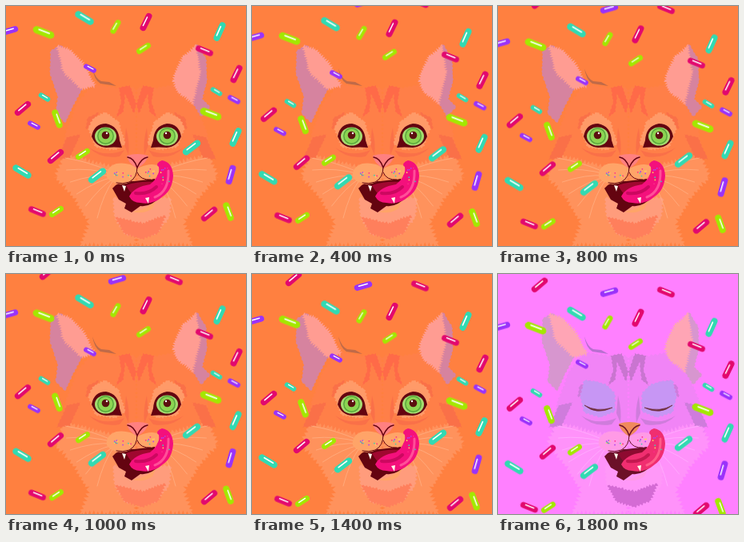
Write an HTML page that moves like this. It is 300x300 px and loops after 2 s.

```html
<!DOCTYPE html>
<html lang="en">
<head>
<meta charset="utf-8">
<title>Cat and sprinkles</title>
<style>
html, body { margin: 0; width: 100%; height: 100%; overflow: hidden; }
svg { display: block; width: 100vw; height: 100vh; animation: mood 2s step-end infinite; }
@keyframes mood {
  0% {
    --bg: #ff8040; --face: #ff7f48; --light: #ff925c; --stripe: #ff6a48; --patch: #fa7048;
    --ear: #d6839f; --inner: #ff9c92; --mark: #c06a48; --bib: #ff9c7c; --chin: #ff7f5c;
    --muzzle: #ffa468; --nose: #ff8080; --line: #640410; --mouth: #a00830; --tongue: #f4107c;
    --shade: #cc0860; --gloss: #ff5098; --hair: #ffb488; --halo: #ff9a68; --day: 1;
  }
  90%, 100% {
    --bg: #ff80ff; --face: #f184f6; --light: #ff92fa; --stripe: #c975d0; --patch: #cf7cdc;
    --ear: #d796cf; --inner: #ffa5b5; --mark: #b870d0; --bib: #ff98f8; --chin: #d46bd4;
    --muzzle: #ff9ae6; --nose: #f08a5c; --line: #6c1028; --mouth: #8e0a30; --tongue: #f02e70;
    --shade: #c41850; --gloss: #ff5c88; --hair: #ffb4ff; --halo: #c796f4; --day: 0;
  }
}
.day { opacity: var(--day); }
.night { opacity: calc(1 - var(--day)); }
.rain { animation: fall 2s steps(10) infinite; }
@keyframes fall { to { transform: translateY(38.5px); } }
</style>
</head>
<body>
<svg id="stage" viewBox="0 0 300 300" preserveAspectRatio="none"></svg>
<script>
let seed = 7;
const rand = () => (seed = (seed * 16807) % 2147483647) / 2147483647;

// Closed outline with ragged tufts along every edge.
function fur(color, outline, tuft = 2, step = 5) {
  const pts = outline.split(' ').map(p => p.split(',').map(Number));
  const out = pts.flatMap(([x, y], i) => {
    const [u, v] = pts[(i + 1) % pts.length];
    const len = Math.hypot(u - x, v - y);
    const n = Math.max(1, Math.round(len / step)) * 2;
    return Array.from({ length: n }, (_, k) => {
      const off = (k % 2 ? 1 : -0.4) * tuft * (0.4 + rand() * 0.8) / len;
      return [x + (u - x) * k / n + (v - y) * off, y + (v - y) * k / n - (u - x) * off];
    });
  });
  return `<polygon points="${out.map(p => p.map(c => c.toFixed(1))).join(' ')}" fill="var(--${color})"/>`;
}
const shape = (color, d) => `<path d="${d}" fill="var(--${color})"/>`;
const stroke = (color, d, w = 1) =>
  `<path d="${d}" fill="none" stroke="var(--${color})" stroke-width="${w}" stroke-linecap="round"/>`;
const ball = (x, y, r, fill) => `<circle cx="${x}" cy="${y}" r="${r}" fill="${fill}"/>`;
const mirror = s => s + `<g transform="translate(326) scale(-1 1)">${s}</g>`;

const ears = () =>
  fur('ear', '56,56 68,49 92,68 96,102 84,124 74,146 62,134 65,114 55,84', 1) +
  fur('inner', '64,50 80,55 97,73 111,100 94,104 72,82', 3, 3) +
  fur('ear', '239,48 250,66 251,94 245,116 255,126 244,138 234,122 230,70', 1) +
  fur('inner', '238,48 219,64 207,92 214,108 234,124 244,84', 3, 3);

const head = () =>
  mirror(fur('face', '163,101 140,102 108,97 88,122 74,160 66,206 110,250 163,262', 2)) +
  mirror(fur('light', '163,204 118,196 72,184 60,214 84,240 102,270 92,300 163,300', 4)) +
  fur('bib', '134,240 206,240 204,264 186,286 150,286 136,264', 2) +
  fur('chin', '137,264 170,272 199,262 190,284 170,291 148,284', 2, 4);

const markings = () =>
  shape('mark', 'M108 78 Q112 91 119 94 L129 95 L138 100 L118 97 Q110 92 108 78Z') +
  mirror(
    fur('stripe', '163,122 155,99 141,102 144,120 137,140 147,132 149,110 160,136', 1) +
    fur('patch', '94,160 76,164 63,192 80,190 86,176', 1) +
    fur('patch', '102,140 116,133 107,148 100,154', 1) +
    shape('patch', 'M104 177 Q124 190 148 180 L142 188 Q118 192 104 177Z') +
    shape('patch', 'M150 152 Q155 170 153 186 L148 174Z'));

function eyes() {
  const open = fur('halo', '103,152 110,140 124,133 140,144 149,172 136,180 112,176', 1.5, 4) +
    shape('line', 'M107 163 Q110 147 125 147 Q141 150 142 168 L145 177 Q135 176 125 177 Q112 176 107 163Z') +
    '<ellipse cx="124.500" cy="163" rx="13.500" ry="11.500" fill="#a4dc70"/>' +
    ball(124.5, 162.5, 10.5, '#58a83c') + ball(124.5, 162.5, 9, '#8cd452') +
    ball(124.5, 161.5, 4.8, '#5c1010') + ball(126, 159, 1.2, '#fff');
  const shut = fur('halo', '108,133 122,134 136,139 146,150 146,172 128,179 108,173 103,152', 1.5) +
    '<path d="M108 164 Q123 177 143 167 Q123 173 108 164Z" fill="#703040" stroke="#703040" stroke-width=".7"/>';
  return `<g class="day">${mirror(open)}</g><g class="night">${mirror(shut)}</g>`;
}

function dots(n, cx, cy, rx, ry) {
  const tint = ['#b040f0', '#ff2c8c', '#ffd060', '#42cdb0'];
  return Array.from({ length: n }, (_, i) => {
    const a = rand() * 2 * Math.PI, r = Math.sqrt(rand());
    return ball(cx + rx * r * Math.cos(a), cy + ry * r * Math.sin(a), 0.9, tint[i % 4]);
  }).join('');
}

const mouth = () =>
  shape('muzzle', 'M158 257 Q178 254 188 242 L183 253 Q172 261 158 257Z') +
  shape('line', 'M133 228 Q140 218 160 219 L186 216 L194 238 Q180 252 168 250 L157 258 L148 253 L150 247 L141 242Z') +
  shape('mouth', 'M150 224 Q166 219 184 220 L180 244 Q160 244 150 224Z') +
  shape('tongue', 'M154 238 Q160 226 180 223 Q192 214 190 203 Q187 195 195 193 Q208 195 209 212 Q208 230 196 238 Q184 249 168 246 Q158 246 154 238Z') +
  stroke('shade', 'M162 234 Q178 236 188 226', 4) +
  stroke('gloss', 'M186 239 Q204 232 203 206', 3) +
  shape('muzzle', 'M164 203 Q154 195 138 197 Q124 202 126 214 Q134 225 150 222 Q161 219 164 208 Q168 218 181 217 Q193 213 191 201 Q184 194 164 203Z') +
  stroke('line', 'M164 201 Q164 215 154 220 Q146 223 138 221 M164 208 Q168 218 181 217') +
  shape('nose', 'M151 187 Q164 183 178 187 Q176 196 164 203 Q153 197 151 187Z') +
  stroke('line', 'M152 189 Q160 190 164 202 Q169 190 177 189', 1.5) +
  '<path d="M145 224 l5 1 l-2 7z M174 240 l5 -1 l-1 8z" fill="#fff4e8"/>' +
  dots(12, 147, 209, 13, 6) + dots(8, 180, 207, 8, 6) + dots(9, 199, 214, 6, 14);

// Each hair starts lower and points further down than the last.
const whiskers = () => mirror(Array.from({ length: 6 }, (_, i) =>
  stroke('hair', `M134 ${208 + 2 * i} q${4 * i - 32} ${6 * i - 14} ${1.6 * i * i - 60} ${13 * i - 18}`, 0.7)).join(''));

// Sprinkles of one colour, tilt and length, centred on the given spots.
function scatter(color, tilt, len, spots) {
  const w = 2.6 + len * 0.22, h = (len - w) / 2;
  const bar = `<path d="M${-h} 0H${h}" stroke="${color}" stroke-width="${w}"/>` +
    `<path d="M${-h * 0.7} ${-w * 0.16}H${h * 0.75}" stroke="#fff" stroke-width="${w * 0.2}"/>`;
  return spots.split(' ').map(at =>
    `<g transform="translate(${at}) rotate(${tilt})" stroke-linecap="round">${bar}</g>`).join('');
}

const pink = '#e2086e', lime = '#a3e800', violet = '#9a32fa', teal = '#31dab2';
const rain = () =>
  scatter(pink, 22, 23, '248,56 39,257 210,-12') +
  scatter(pink, -40, 24, '21,128 62,188 254,260 52,-21') +
  scatter(pink, -64, 24, '175,20 288,85') +
  scatter(lime, 21, 28, '47,33 256,135') +
  scatter(lime, -33, 20, '172,53 96,185 63,257') +
  scatter(lime, -60, 19, '137,26') +
  scatter(lime, 70, 24, '64,141 278,257') +
  scatter(violet, 28, 17, '105,78 35,149 285,117') +
  scatter(violet, -16, 23, '4,31 139,-12') +
  scatter(violet, -74, 25, '281,211') +
  scatter(teal, 31, 26, '98,15 20,207') +
  scatter(teal, 31, 16, '48,114 263,107') +
  scatter(teal, -37, 26, '114,212 232,177') +
  scatter(teal, -66, 25, '267,32 287,164');

document.getElementById('stage').innerHTML =
  '<rect width="300" height="300" fill="var(--bg)"/>' +
  head() + ears() + markings() + eyes() + whiskers() + mouth() +
  `<g class="rain">${rain()}</g>`;
</script>
</body>
</html>
```
